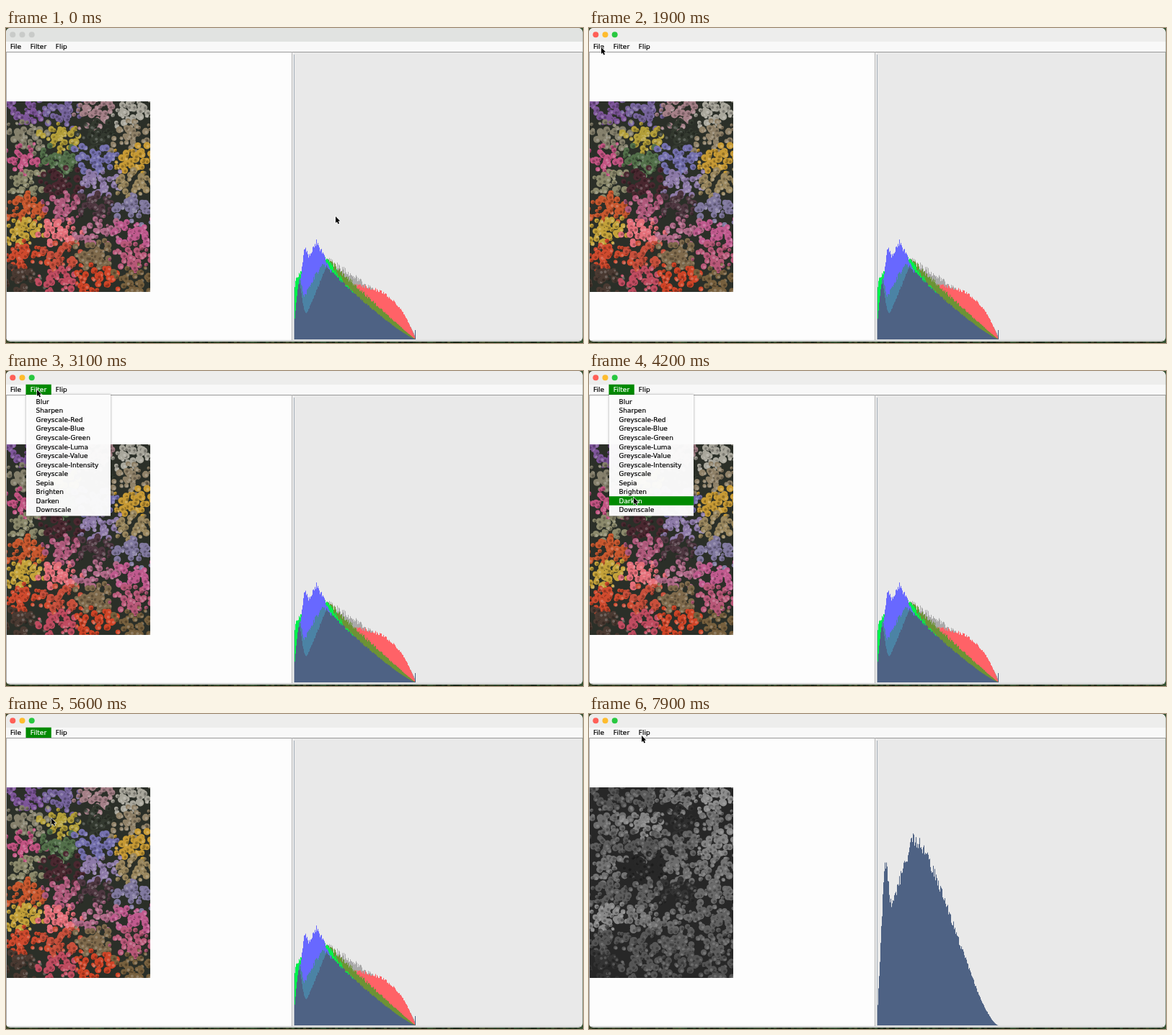
These frames come from a looping animation (800 px wide and 438 px high, 8 s). An HTML page with a canvas:

```html
<!DOCTYPE html>
<html lang="en">
<head>
<meta charset="utf-8">
<title>Image editor</title>
<style>
html, body { margin: 0; width: 100%; height: 100%; overflow: hidden; background: #26301f; }
canvas { display: block; }
</style>
</head>
<body>
<canvas id="stage" width="800" height="438"></canvas>
<script>
const ctx = document.getElementById('stage').getContext('2d');
const LOOP = 8000, STEP = 100;
const FOCUS = 900, OPEN = 2700, CLOSE = 5400, APPLY = 6000;
const GREEN = '#008a00', STEEL = '#4e6284', INK = '#000';
const ROW_TOP = 36.3, ROW_H = 12.54;
const ITEMS = ['Blur', 'Sharpen', 'Greyscale-Red', 'Greyscale-Blue', 'Greyscale-Green',
  'Greyscale-Luma', 'Greyscale-Value', 'Greyscale-Intensity', 'Greyscale', 'Sepia',
  'Brighten', 'Darken', 'Downscale'];

// Pointer moves: start, end, and where each one arrives
const HOME = [457, 262];
const MOVES = [[900, 1800, 17, 27], [2200, 2700, 43, 26], [3200, 4100, 62, 176],
  [4500, 5100, 63, 145], [7200, 7700, 73, 30]];

function random(seed) {
  return () => (seed = (seed * 16807) % 2147483647) / 2147483647;
}

function rect(c, color, x, y, w, h) {
  c.fillStyle = color;
  c.fillRect(x, y, w, h);
}

function dot(c, color, x, y, r) {
  c.fillStyle = color;
  c.beginPath();
  c.arc(x, y, r, 0, 7);
  c.fill();
}

function layer(w, h, draw) {
  const canvas = document.createElement('canvas');
  canvas.width = w;
  canvas.height = h;
  draw(canvas.getContext('2d'));
  return canvas;
}

function text(str, x, y, color = INK) {
  ctx.fillStyle = ctx.strokeStyle = color;
  ctx.lineWidth = .2;
  ctx.fillText(str, x, y);
  ctx.strokeText(str, x, y);
}

// Photograph reduced to shelves of bunches, each a loose heap of flat petals
const SHELVES = [
  ['#7d5599', '#76649c', '#a58088', '#a9a79c'],
  ['#85806c', '#b39f3a', '#343a30', '#8f8168'],
  ['#c25482', '#53704a', '#7470ae', '#c79a35'],
  ['#8c8a6c', '#4a2830', '#8d7aa8', '#9a875e'],
  ['#c9582f', '#b05a7c', '#4e3740', '#81799f'],
  ['#c4a23a', '#e5707a', '#b06a88', '#c05a8e'],
  ['#cf4a2e', '#c8503c', '#7f6a4c', '#b85878'],
  ['#4a3a32', '#c04c60', '#cf4427', '#77603e']
];

const photo = layer(199, 265, c => {
  const rnd = random(29), spread = size => (rnd() + rnd() - 1) * size;
  rect(c, '#2b2f28', 0, 0, 199, 265);
  SHELVES.forEach((shelf, row) => shelf.forEach((color, col) => {
    for (let i = 0; i < 45; i++) {
      const x = 25 + col * 50 + spread(34), y = 16 + row * 33 + spread(24);
      dot(c, color, x, y, 2 + rnd() * 3);
      dot(c, rnd() < .6 ? '#0004' : '#fff3', x + 1, y + 1, 2);
    }
  }));
});

const greyPhoto = layer(199, 265, c => {
  c.filter = 'grayscale(1) brightness(.85)';
  c.drawImage(photo, 0, 0);
});

// Histogram: a rise to a peak and a fall to the right end, plus an optional early bump
const LEFT = 400, BASE = 433, SPAN = 168;

function level(u, { peak, height, rise = 1, bend = 1, fall = 1, bump = 0, at = 0, width = 1 }) {
  const s = (u - peak) / (SPAN - peak);
  const body = u < peak ? (u / peak) ** rise : (1 - s ** bend) ** fall;
  return height * body + bump * Math.exp(-(((u - at) / width) ** 2));
}

function bars(c, color, jitter, shape) {
  const rnd = random(shape.height * 7919);
  for (let u = 0; u < SPAN; u++) {
    const h = level(u + .5, shape) * (1 + (rnd() - .5) * jitter);
    rect(c, color, LEFT + u, BASE - h, 1, h);
  }
}

const colorHist = layer(800, 438, c => {
  bars(c, '#a9a9a9', .1, { peak: 46, height: 110, rise: 2, fall: .65 });
  bars(c, '#ff6267', .07, { peak: 1, height: 76, bend: 6 });
  bars(c, '#6c9235', .08, { peak: 46, height: 112, rise: 2, fall: 1.05 });
  bars(c, '#00f04c', .08, { peak: 46, height: 111, rise: .1, fall: 1.6 });
  bars(c, '#6868ff', .06, { peak: 31, height: 136, rise: .4, fall: 2.2, bump: 27, at: 14, width: 4 });
  bars(c, '#4b83a5', .08, { peak: 41, height: 107, rise: .55, fall: 1.9, bump: 45, at: 7, width: 4 });
  bars(c, STEEL, .05, { peak: 44, height: 101, rise: 1.1, fall: 1.2, bump: 66, at: 6, width: 6 });
  rect(c, STEEL, 567, 420, 1, 13);
});

const greyHist = layer(800, 438, c => bars(c, STEEL, .08,
  { peak: 50, height: 260, rise: .53, bend: 1.5, fall: 1.6, bump: 108, at: 10.5, width: 6 }));

const frame = layer(800, 438, c => {
  const rnd = random(97);
  for (let x = 0; x < 800; x += 4) {
    rect(c, `hsl(${80 + rnd() * 40} 25% ${12 + rnd() * 14}%)`, x, 0, 4, 438);
  }
  c.beginPath();
  c.roundRect(0, 0, 799.5, 436, 6);
  c.clip();
  rect(c, '#e9e9e9', 0, 0, 800, 438);
  rect(c, '#f8f8f8', 0, 19, 800, 14);
  rect(c, '#fdfdfd', 1, 34, 395, 400);
  rect(c, '#999', 0, 33, 800, 1);
  rect(c, '#aaa', 0, 33, 1, 402);
  rect(c, '#b4b4b4', 396, 33, 1, 402);
  rect(c, '#eee', 397, 34, 2, 401);
  rect(c, '#a3adb8', 399, 37, 1, 396);
  rect(c, '#c4c6c6', 0, 434, 800, 1);
});

function titleBar(active) {
  ctx.fillStyle = active ? '#ededec' : '#e1e3e1';
  ctx.beginPath();
  ctx.roundRect(0, 0, 799.5, 19, [6, 6, 0, 0]);
  ctx.fill();
  ['#ff5f57', '#febc2e', '#28c840'].forEach((color, i) =>
    dot(ctx, active ? color : '#c9cbc9', 9.3 + 13.2 * i, 9.3, 4));
}

function menu(y) {
  ctx.save();
  ctx.shadowColor = '#0006';
  ctx.shadowBlur = 3;
  rect(ctx, '#fffffff5', 28, 33, 117, 168.5);
  ctx.restore();
  const hover = Math.floor((y - ROW_TOP) / ROW_H);
  ITEMS.forEach((item, i) => {
    const top = ROW_TOP + i * ROW_H;
    if (i === hover) rect(ctx, GREEN, 28, top, 117, ROW_H);
    text(item, 41.5, top + 9.5, i === hover ? '#fff' : INK);
  });
}

const arrow = new Path2D('M0 0V9L2 7.2L3.4 10.4L5 9.7L3.6 6.6H6.3Z');
function pointer(x, y) {
  ctx.save();
  ctx.translate(x, y);
  ctx.lineWidth = 1.2;
  ctx.strokeStyle = '#fff';
  ctx.stroke(arrow);
  ctx.fillStyle = '#000';
  ctx.fill(arrow);
  ctx.restore();
}

function pointerAt(t) {
  let [x, y] = HOME;
  for (const [start, end, toX, toY] of MOVES) {
    const p = Math.min(1, Math.max(0, (t - start) / (end - start)));
    const k = p * p * (3 - 2 * p);
    x += (toX - x) * k;
    y += (toY - y) * k;
  }
  return [x, y];
}

function draw(t) {
  const [x, y] = pointerAt(t), grey = t >= APPLY;
  const selected = t >= OPEN && t < APPLY;
  ctx.drawImage(frame, 0, 0);
  titleBar(t >= FOCUS);
  ctx.drawImage(grey ? greyPhoto : photo, 1, 102);
  ctx.drawImage(grey ? greyHist : colorHist, 0, 0);
  ctx.font = '9px "DejaVu Sans", sans-serif';
  if (selected) rect(ctx, GREEN, 27.5, 18.7, 35.3, 14.3);
  text('File', 6, 29);
  text('Filter', 33.8, 29, selected ? '#fff' : INK);
  text('Flip', 68.8, 29);
  if (t >= OPEN && t < CLOSE) menu(y);
  pointer(x, y);
}

function tick(now) {
  draw(Math.floor(now % LOOP / STEP) * STEP);
  requestAnimationFrame(tick);
}
requestAnimationFrame(tick);
</script>
</body>
</html>
```
